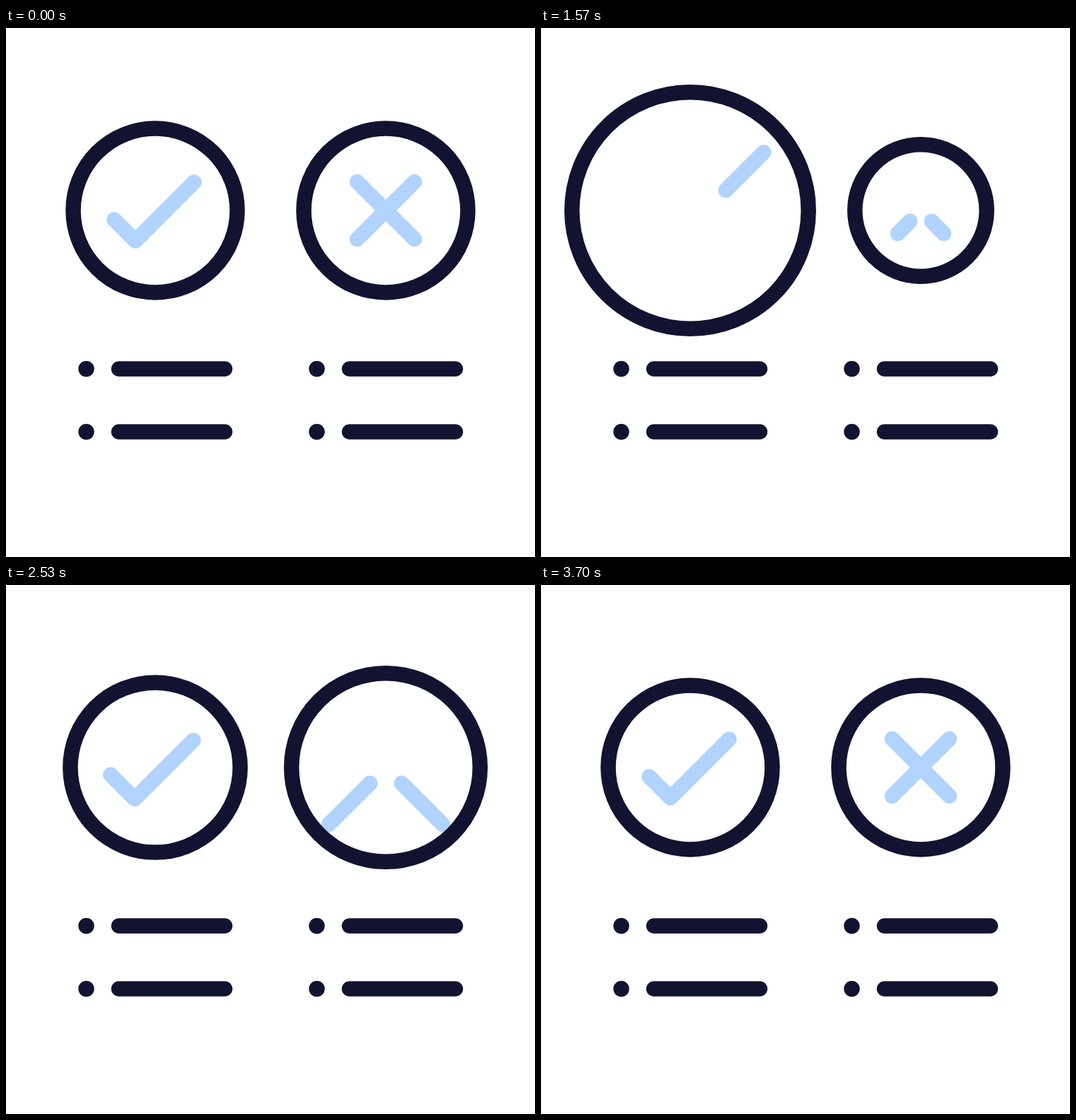
An HTML page with a canvas that plays this animation: 748x748 px, repeating every 3730 ms.

```html
<!DOCTYPE html>
<html lang="en">
<head>
<meta charset="utf-8">
<title>Pros and cons</title>
<style>
  html, body { margin: 0; width: 100%; height: 100%; overflow: hidden; background: #fff; }
  canvas { display: block; width: 100vmin; height: 100vmin; }
</style>
</head>
<body>
<canvas width="748" height="748"></canvas>
<script>
const ctx = document.querySelector('canvas').getContext('2d');
const DARK = '#121331', LIGHT = '#b0d3ff';
const LOOP = 3730, STEP = 30, REST_RADIUS = 116, CENTER_Y = 258;

const clamp = (v, lo, hi) => Math.min(hi, Math.max(lo, v));
const sine = p => (1 - Math.cos(Math.PI * p)) / 2;

// Cubic bezier (a, 0, b, 1), solved by bisection
const bezier = (a, b) => p => {
  let lo = 0, hi = 1, k = 0.5;
  for (let i = 0; i < 24; i++) {
    k = (lo + hi) / 2;
    const x = 3 * a * k * (1 - k) ** 2 + 3 * b * k * k * (1 - k) + k ** 3;
    if (x < p) lo = k; else hi = k;
  }
  return k * k * (3 - 2 * k);
};
const swell = bezier(0.3, 0.17);

function track(t, times, values, eases = []) {
  if (t <= times[0]) return values[0];
  for (let i = 1; i < times.length; i++) {
    if (t < times[i]) {
      const p = (t - times[i - 1]) / (times[i] - times[i - 1]);
      return values[i - 1] + (values[i] - values[i - 1]) * (eases[i] || sine)(p);
    }
  }
  return values[values.length - 1];
}

const RADIUS_TIMES = [720, 1040, 1650, 2150, 2650, 3050];
const SLIDE_TIMES = [1410, 1885, 2150, 2600, 3050];

// rest and limit hold the tail and front of a mark, measured along its path
const badges = [
  {
    x: 211, delay: 0,
    radii: [REST_RADIUS, 85, 168, 99, 123.4, REST_RADIUS],
    slide: [-140, 45, -5, 3.5, 0],
    rest: [-55, 58], limit: [-72, 84], corner: 28,
    arms: [v => [-v, v < 28 ? 15 + v : 71 - v]]
  },
  {
    x: 537, delay: 640,
    radii: [REST_RADIUS, 85, 161, 102, 124.5, REST_RADIUS],
    slide: [-112, 60, -8, 8, 0],
    rest: [-40.5, 40.5], limit: [-70, 70],
    arms: [v => [v, v], v => [-v, v]]
  }
];

function markSpan({ rest, limit, slide }, t) {
  if (t < SLIDE_TIMES[0]) return [track(t, [720, 1040], rest), rest[1]];
  const offset = track(t, SLIDE_TIMES, slide);
  return rest.map(end => clamp(end + offset, limit[0], limit[1]));
}

function polyline(points, color) {
  ctx.strokeStyle = color;
  ctx.beginPath();
  points.forEach(([x, y]) => ctx.lineTo(x, y));
  ctx.stroke();
}

function disc(x, y, r) {
  ctx.beginPath();
  ctx.arc(x, y, r, 0, 2 * Math.PI);
}

function drawBadge(badge, time) {
  const t = time - badge.delay;
  const radius = track(t, RADIUS_TIMES, badge.radii, [, , swell]);
  const scale = radius / REST_RADIUS;
  const [tail, front] = markSpan(badge, t);

  if (front - tail > 0.2) {
    const stops = [tail, front];
    if (tail < badge.corner && badge.corner < front) stops.splice(1, 0, badge.corner);
    for (const arm of badge.arms) {
      polyline(stops.map(arm).map(([x, y]) => [badge.x + x * scale, CENTER_Y + y * scale]), LIGHT);
    }
  }
  ctx.strokeStyle = DARK;
  disc(badge.x, CENTER_Y, radius);
  ctx.stroke();
}

function drawList(x) {
  for (const y of [482, 571]) {
    ctx.fillStyle = DARK;
    disc(x - 97.5, y, 11.2);
    ctx.fill();
    polyline([[x - 51.5, y], [x + 98.5, y]], DARK);
  }
}

function draw(now) {
  const t = Math.floor((now % LOOP - 10) / STEP) * STEP + 10;
  ctx.fillStyle = '#fff';
  ctx.fillRect(0, 0, 748, 748);
  ctx.lineWidth = 21.5;
  ctx.lineCap = ctx.lineJoin = 'round';
  for (const badge of badges) {
    drawBadge(badge, t);
    drawList(badge.x);
  }
}

const start = performance.now();
function tick() {
  draw(performance.now() - start);
  requestAnimationFrame(tick);
}
tick();
</script>
</body>
</html>
```
